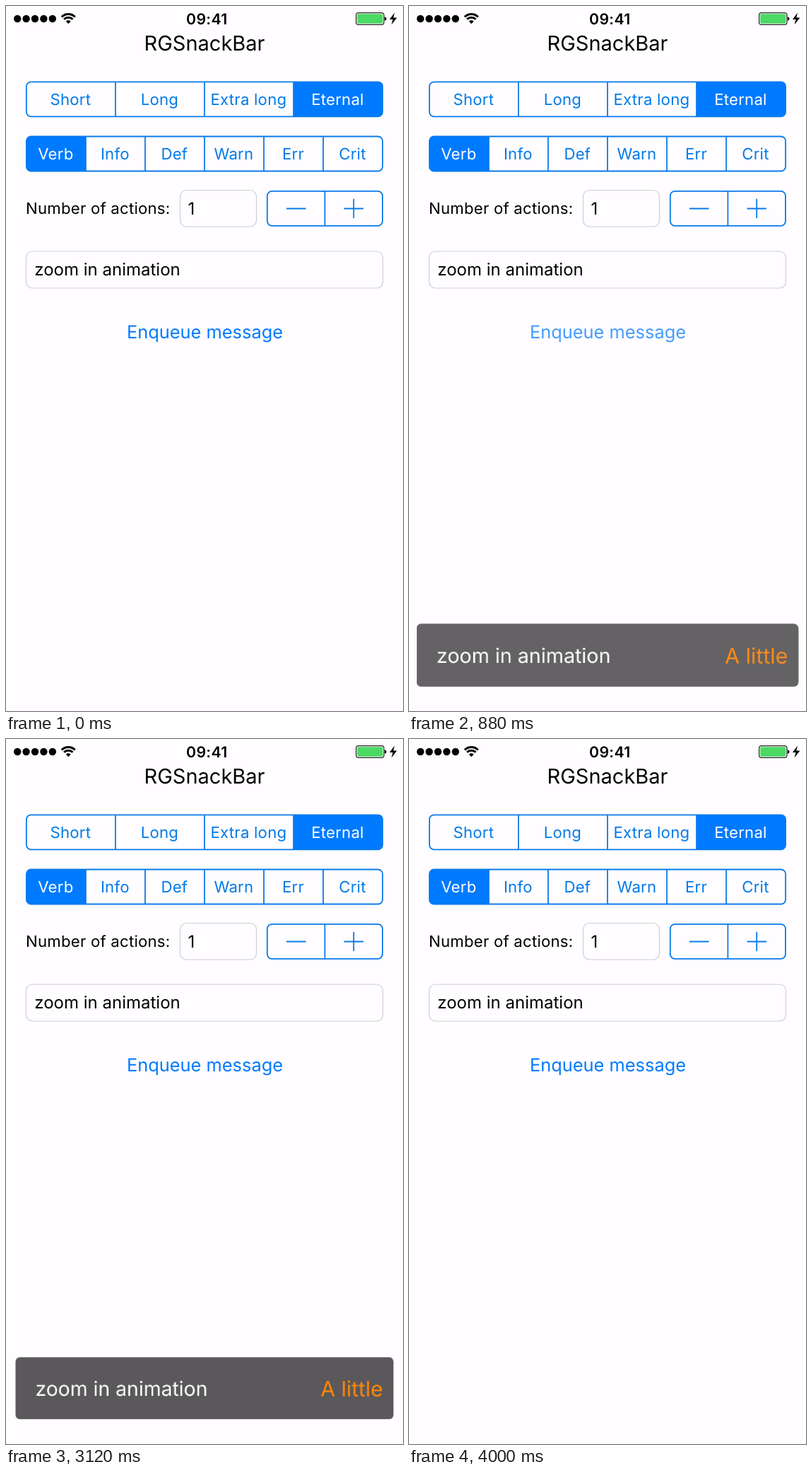
Write an HTML page that moves like this. It is 562x997 px and loops after 4.04 s.

```html
<!DOCTYPE html>
<html lang="en">
<head>
<meta charset="utf-8">
<title>Snack bar zoom</title>
<style>
  html, body { margin: 0; width: 100%; height: 100%; overflow: hidden; background: #fffdff; }
  svg { display: block; width: 562px; height: 997px; }
  text { font-family: Inter, Roboto, sans-serif; text-rendering: geometricPrecision; }
  .blue { fill: #007aff; }
  .line { fill: none; stroke: #0a7aea; stroke-width: 1.8; }
  .field { fill: #fffdff; stroke: #cfced3; stroke-width: 1.2; }
  .small { font-size: 22.2px; letter-spacing: .22px; }
  .mid { text-anchor: middle; }
  #snack { transform-origin: 281px 918px; opacity: 0; }
</style>
</head>
<body>
<svg viewBox="0 0 562 997">
  <g id="status">
    <g fill="none" stroke="#000" stroke-width="2.9">
      <path d="M78.8 15.5A13.4 13.4 0 0 1 97.8 15.5"/>
      <path d="M82.1 18.8A8.8 8.8 0 0 1 94.5 18.8"/>
    </g>
    <path d="M88.3 25.2L84.9 21.7A4.8 4.8 0 0 1 91.7 21.7Z"/>
    <text class="mid" x="284.3" y="25.6" font-size="21.3" font-weight="600" letter-spacing=".3">09:41</text>
    <rect x="495.6" y="9.6" width="39.4" height="16.8" rx="3.4" fill="#fffdff" stroke="#222" stroke-width="1.2"/>
    <rect x="497.2" y="11.2" width="36.2" height="13.6" rx="2" fill="#4cd964"/>
    <path d="M536 15.2Q538.6 15.6 538.6 18T536 20.8Z"/>
    <path d="M550 9.5L543 19H547.6L545.6 26.5L553.4 16.4H548.4Z"/>
  </g>
  <text class="mid" x="281" y="63.3" font-size="29">RGSnackBar</text>

  <g id="segments"></g>

  <text class="small" x="28" y="294.3">Number of actions:</text>
  <rect class="field" x="246.5" y="260.5" width="108" height="51.5" rx="9"/>
  <text x="257.5" y="294.8" font-size="24">1</text>
  <rect class="line" x="369.8" y="261.9" width="163.2" height="48.9" rx="6.5"/>
  <path class="line" d="M451.4 262V310.5"/>
  <path class="line" stroke-width="2" d="M397 286.5H424.5M478.5 286.5H506M492.2 272.7V300"/>

  <rect class="field" x="28.5" y="347" width="505" height="52" rx="9"/>
  <text x="40.3" y="381.3" font-size="24">zoom in animation</text>
  <text id="enqueue" class="mid blue" x="281.5" y="470.2" font-size="25.4">Enqueue message</text>

  <g id="snack">
    <rect x="14" y="874.3" width="534" height="87.6" rx="6.5" fill="#595759"/>
    <text x="42" y="928.6" font-size="28.3" fill="#fff">zoom in animation</text>
    <text class="mid" x="489" y="929.3" font-size="30" fill="#ff8508">A little</text>
  </g>
</svg>
<script>
const LOOP = 4040;
const LEFT = 28.9, WIDTH = 504.2;

function add(parent, tag, attrs, text) {
  const el = document.createElementNS('http://www.w3.org/2000/svg', tag);
  for (const key in attrs) el.setAttribute(key, attrs[key]);
  if (text) el.textContent = text;
  parent.append(el);
}

function segmented(top, labels, selected) {
  const group = document.getElementById('segments');
  const step = WIDTH / labels.length, h = 49, r = 6.5;
  const x = LEFT + selected * step;
  // The selected cell is at one end, so only its outer corners are round.
  const [outer, dir] = selected ? [x + step, -1] : [x, 1];
  add(group, 'path', {
    class: 'blue',
    d: `M${outer + dir * step} ${top}H${outer + dir * r}Q${outer} ${top} ${outer} ${top + r}` +
       `V${top + h - r}Q${outer} ${top + h} ${outer + dir * r} ${top + h}H${outer + dir * step}Z`
  });
  add(group, 'rect', { class: 'line', x: LEFT, y: top, width: WIDTH, height: h, rx: r });
  labels.forEach((label, i) => {
    const left = LEFT + i * step;
    if (i) add(group, 'path', { class: 'line', d: `M${left} ${top}v${h}` });
    add(group, 'text', {
      class: 'small mid', x: left + step / 2 - .6, y: top + 32.6,
      fill: i === selected ? '#fff' : '#007ae8'
    }, label);
  });
}

// Each step is [time in ms, style, easing towards the next step].
function play(id, steps) {
  const frames = steps.map(([time, style, easing = 'linear']) =>
    ({ ...style, offset: time / LOOP, easing }));
  document.getElementById(id).animate(frames, { duration: LOOP, iterations: Infinity });
}

for (let i = 0; i < 5; i++)
  add(document.getElementById('status'), 'circle', { cx: 16.2 + i * 12.4, cy: 18, r: 5.2 });

segmented(107.3, ['Short', 'Long', 'Extra long', 'Eternal'], 3);
segmented(184.5, ['Verb', 'Info', 'Def', 'Warn', 'Err', 'Crit'], 0);

const solid = { opacity: 1 }, dim = { opacity: .2 };
play('enqueue', [
  [0, solid], [240, solid], [240, dim],
  [680, dim, 'ease-in-out'], [1013, solid], [LOOP, solid]
]);

const away = { opacity: 0, transform: 'scale(1.2)' };
const shown = { opacity: 1, transform: 'scale(1)' };
play('snack', [
  [0, away], [674, away, 'ease-in-out'], [926, shown],
  [3105, shown, 'ease-in-out'], [3315, away], [LOOP, away]
]);
</script>
</body>
</html>
```
